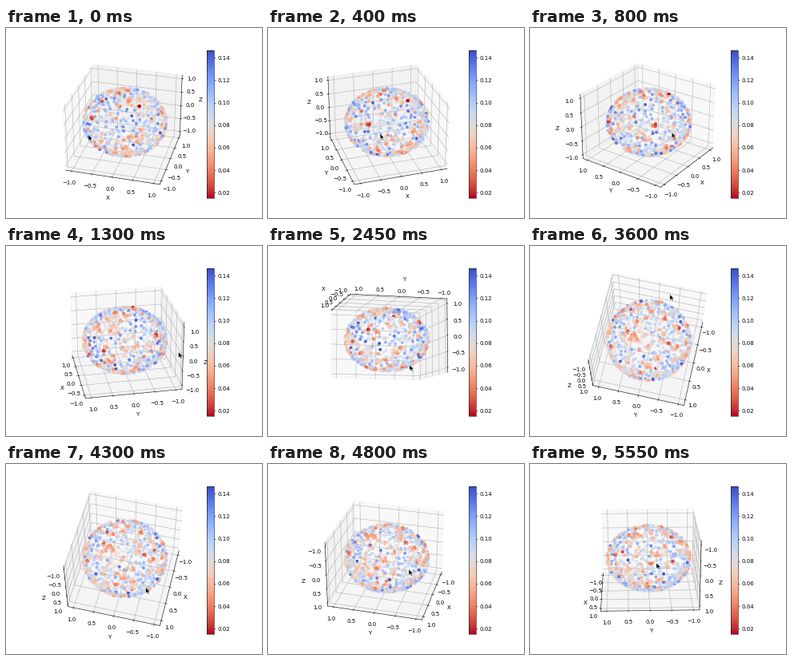
A matplotlib script for the animation above (5600 ms loop, 320 by 238 pixels).

```python
import numpy as np
import matplotlib.pyplot as plt
from matplotlib.animation import FuncAnimation
from matplotlib.patches import Polygon

W, H, DPI = 320, 238, 50
STEP, LOOP = 50, 5600
VMIN, VMAX = 0.0157, 0.1466
AZIM, ELEV = -75, 30        # view at the start of the loop
LAG = 50                    # the view trails the pointer (ms)

# Mouse drags: start and end time, start and end position of the pointer.
# The view turns one degree per pixel dragged.
DRAGS = [
    (0, 1250, (103, 134), (219, 129)),
    (1950, 2450, (173, 185), (177, 149)),
    (2450, 3550, (177, 149), (175, 47)),
    (4000, 4750, (174, 170), (176, 132)),
    (4900, 5550, (176, 132), (158, 124)),
]
CLUSTERS = [(-.76, .63, .165), (-.63, -.62, .47), (.43, -.28, .86)]
ARROW = np.array([(0, 0), (0, 7), (1.7, 5.5), (2.9, 8.2),
                  (4.1, 7.6), (2.9, 5.1), (5, 5)])


def on_sphere(p):
    p = np.asarray(p, float)
    return p / np.linalg.norm(p, axis=-1, keepdims=True)


def make_points(n=850):
    """Random points on the unit sphere plus a few tight clusters."""
    rng = np.random.default_rng(12)
    tight = np.repeat(on_sphere(CLUSTERS), 4, axis=0)
    tight += rng.normal(0, 0.01, tight.shape)
    return on_sphere(np.vstack([rng.normal(size=(n, 3)), tight]))


def spacing(pts, k=3):
    """Mean distance to the k nearest neighbours, fitted to the colour range."""
    gaps = np.linalg.norm(pts[:, None] - pts[None], axis=-1)
    d = np.sort(gaps, axis=1)[:, 1:k + 1].mean(axis=1)
    return np.clip(0.079 + 0.026 * (d - d.mean()) / d.std(), VMIN, VMAX)


def pointer_at(t):
    """Pointer position: along each drag, gliding freely between drags."""
    times = [s for t0, t1, *_ in DRAGS for s in (t0, t1)]
    places = np.array([p for *_, a, b in DRAGS for p in (a, b)])
    return [np.interp(t, times, col) for col in places.T]


def view_at(t):
    """Azimuth and elevation after all dragging done up to time t."""
    turn = sum(np.subtract(b, a) * np.clip((t - t0) / (t1 - t0), 0, 1)
               for t0, t1, a, b in DRAGS)
    return AZIM - turn[0], ELEV + turn[1]


points = make_points()
fig = plt.figure(figsize=(W / DPI, H / DPI), dpi=DPI)
fig.subplots_adjust(top=0.8835, bottom=0.107)
ax = fig.add_subplot(projection="3d")
cloud = ax.scatter(*points.T, c=spacing(points), cmap="coolwarm_r",
                   vmin=VMIN, vmax=VMAX)
ax.set(xlabel="X", ylabel="Y", zlabel="Z")
fig.colorbar(cloud)

pointer = Polygon(ARROW, closed=True, fc="black", ec="white", lw=0.5,
                  transform=None, zorder=10)
fig.add_artist(pointer)


def update(i):
    t = i * STEP
    azim, elev = view_at(t - LAG)
    ax.view_init(elev=elev, azim=azim)
    x, y = pointer_at(t)
    pointer.set_xy(np.column_stack([x + ARROW[:, 0], H - y - ARROW[:, 1]]))
    return cloud, pointer


anim = FuncAnimation(fig, update, frames=LOOP // STEP, interval=STEP,
                     repeat=True, repeat_delay=0, blit=False)
plt.show()
```
